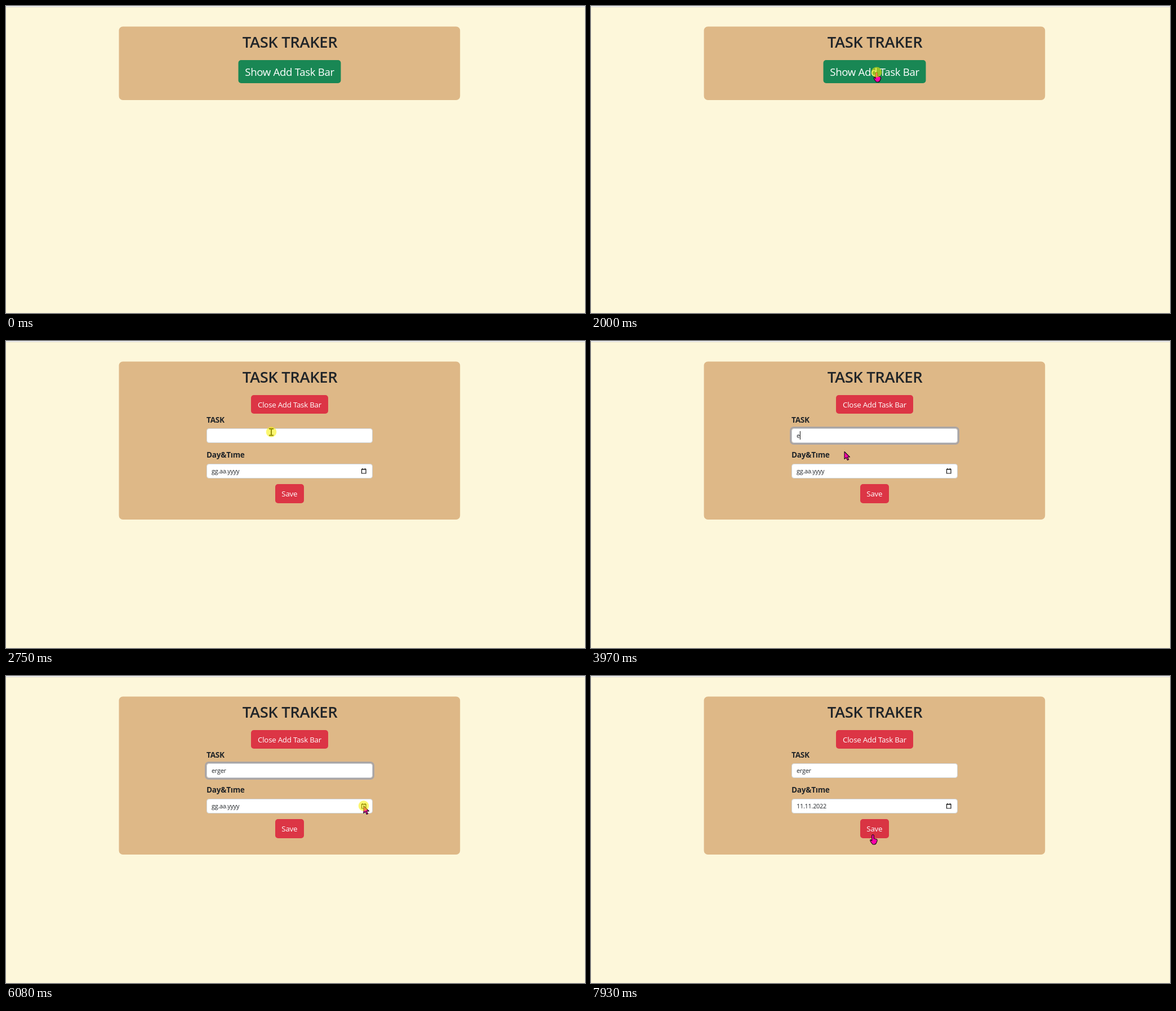
An HTML page for the animation above (8 s loop, 1028 by 545 pixels).

```html
<!DOCTYPE html>
<html lang="en">
<head>
<meta charset="utf-8">
<title>Task tracker</title>
<style>
  html, body { margin: 0; width: 100%; height: 100%; overflow: hidden; background: #fdf7da; }
  svg { display: block; width: 1028px; height: 545px; }
  text { font-family: "Open Sans", "Noto Sans", sans-serif; letter-spacing: -.018em; fill: #212529; white-space: pre; }
  .title { font-size: 27.4px; font-weight: 600; letter-spacing: -.014em; }
  .mid { text-anchor: middle; }
  .btn { font-size: 13.3px; fill: #fff; }
  .big { font-size: 18.65px; }
  .label { font-size: 13.6px; font-weight: 700; }
  .field { font-size: 10.8px; letter-spacing: -.02em; }
  .input { fill: #fff; stroke: #ced4da; }
  .cal text { font: 8.2px "Liberation Sans", Arial, sans-serif; letter-spacing: 0; fill: #101010; }
  .cal .month { font-size: 8px; font-weight: 700; }
  .cal .link { font-size: 8px; fill: #0069c8; }
  .cal .dim { fill: #777; }
  .cal .today { fill: #fff; font-weight: 700; }
  .pop { filter: drop-shadow(0 1px 2px rgba(0, 0, 0, .35)); }
  .pink { fill: #f0a; stroke: #1a0a14; stroke-width: 1.1; stroke-linejoin: round; }
</style>
</head>
<body>
<svg viewBox="0 0 1028 545">
  <rect width="1028" height="545" fill="#fdf7da"/>
  <rect width="1028" height="1" fill="#fff"/>
  <rect y="1" width="1028" height="1" fill="#d3d3d1"/>
  <rect id="panel" x="200.5" y="36.5" width="605.7" height="130.5" rx="7" fill="#deb887"/>
  <text class="title mid" x="504" y="74.3">TASK TRAKER</text>

  <g id="closed">
    <rect x="412.5" y="96" width="182" height="41" rx="5" fill="#198754"/>
    <text class="btn big mid" x="503.5" y="124">Show Add Task Bar</text>
  </g>

  <g id="form">
    <rect x="435" y="96" width="137" height="33" rx="5" fill="#dc3545"/>
    <text class="btn mid" x="503.5" y="117.7">Close Add Task Bar</text>
    <text class="label" x="356" y="144.7">TASK</text>
    <rect id="ring" x="354.5" y="153.5" width="298" height="29" rx="5.5" fill="none" stroke="#0d6efd" stroke-opacity=".25" stroke-width="3"/>
    <rect id="task" class="input" x="356.5" y="155.5" width="294" height="25" rx="4"/>
    <text id="typed" class="field" x="365" y="172"></text>
    <rect id="caret" y="160" width="1" height="15" fill="#111"/>
    <text class="label" x="356" y="206.7">Day&amp;Tıme</text>
    <rect class="input" x="356.5" y="218.5" width="294" height="25" rx="4"/>
    <text id="date" class="field" x="365" y="235"></text>
    <path d="M631.5 227.5h7.5v7.5h-7.5zM631 228h8.5M633 226v1.5M637.5 226v1.5" fill="none" stroke="#111" stroke-width="1.2"/>
    <rect id="save" x="478" y="254" width="51" height="34" rx="5"/>
    <text class="btn mid" x="503.3" y="276">Save</text>
  </g>

  <g id="hints">
    <rect id="hintBox" y="129.5" height="30" fill="#f2f2f2" stroke="#cbcbcb"/>
    <text class="field" y="149"></text>
    <text class="field" y="149"></text>
    <text class="field" y="149"></text>
  </g>

  <g id="cal" class="cal">
    <rect class="pop" x="356.5" y="244.5" width="148" height="190" fill="#fff" stroke="#bdbdbd"/>
    <text class="month" x="363.7" y="262.7">Kasım 2022</text>
    <path d="M411 259h4.6l-2.3 2.6z" fill="#111"/>
    <path d="M465.5 265.5v-10m-4.5 4.5l4.5-4.5l4.5 4.5M487.5 255v10m-4.5-4.5l4.5 4.5l4.5-4.5" fill="none" stroke="#222"/>
    <rect x="478" y="294.8" width="18" height="18" fill="#0075ff" stroke="#101010"/>
    <rect id="hover" x="440.5" y="314.2" width="18" height="18" fill="#dfe9f5" stroke="#22304a"/>
    <g id="days"></g>
    <text class="link" x="371" y="424">Temizle</text>
    <text class="link" x="465.7" y="424">Bugün</text>
  </g>

  <g id="pointer">
    <path id="arrow" class="pink" d="M0 0V13L3 10.3L5.3 15L7.6 14L5.3 9.5H9.5Z"/>
    <path id="hand" class="pink" d="M-1.8 1.5Q0-1 1.8 1.5V7L6.5 8.3Q8 8.8 7.5 11.5L6 15Q5 17.5 2 17.5H0Q-2 16-4 12.5Q-5.5 9.5-4 9L-1.8 11Z"/>
    <path id="beam" d="M-4-5.5H4M0-5.5V6M-4 6H4" fill="none" stroke="#111" stroke-width="2"/>
    <circle id="halo" r="9.3" fill="#faf000" fill-opacity=".56"/>
  </g>
</svg>

<script>
const LOOP = 8000, STEP = 70;
const OPEN = 2140, FOCUS = 2800, BLUR = 6080, CAL_OPEN = 6270, CAL_CLOSE = 7300;
const WORD = 'erger', FIRST_KEY = 3970, KEY_GAP = 182, BLINK = 500;
const CLICKS = [1870, 2750, BLUR, 7100], CLICK_TIME = 200;

const hints = { er: ['er', 'ere', 'erk'], erger: ['eğer', 'erer', 'erge'] };

// each move bows sideways by a share of its length
const home = { x: 988, y: 531 };
const moves = [
  { from: 130, to: 900, x: 559, y: 187, bow: -.07 },
  { from: 970, to: 1600, x: 507, y: 117.5, bow: -.8 },
  { from: 2200, to: 2550, x: 471, y: 161.5, bow: 0 },
  { from: 2890, to: 3170, x: 450, y: 196.5, bow: 0 },
  { from: 5100, to: 5870, x: 635, y: 230.5, bow: .15 },
  { from: CAL_OPEN, to: 6900, x: 450, y: 323.5, bow: -.15 },
  { from: CAL_CLOSE, to: 7930, x: 500.5, y: 281.5, bow: 0 }
];

const $ = id => document.getElementById(id);
const show = (id, on) => $(id).setAttribute('display', on ? 'inline' : 'none');
const set = (id, attrs) => { for (const k in attrs) $(id).setAttribute(k, attrs[k]); };
const clamp = v => Math.min(1, Math.max(0, v));
const easeOut = u => 1 - (1 - u) ** 2;

function buildDays() {
  const cell = (col, row, label, cls = '') =>
    `<text class="mid ${cls}" x="${373 + col * 19}" y="${287 + row * 19.2 + (row ? .7 : 0)}">${label}</text>`;
  let out = 'Pt Sa Ça Pe Cu Ct Pa'.split(' ').map((d, i) => cell(i, 0, d)).join('');
  for (let i = 0; i < 42; i++) {
    const day = i ? (i - 1) % 30 + 1 : 31;
    const cls = i === 6 ? 'today' : i === 0 || i > 30 ? 'dim' : '';
    out += cell(i % 7, 1 + Math.floor(i / 7), day, cls);
  }
  $('days').innerHTML = out;
}

function pointerAt(t) {
  const i = Math.max(0, moves.findLastIndex(m => t >= m.from));
  const a = moves[i - 1] || home, b = moves[i];
  const u = easeOut(clamp(Math.floor((t - b.from) / STEP) * STEP / (b.to - b.from)));
  const dx = b.x - a.x, dy = b.y - a.y, side = 2 * u * (1 - u) * b.bow;
  return [a.x + dx * u - dy * side, a.y + dy * u + dx * side];
}

function drawPointer(t, open, calendar) {
  const [x, y] = pointerAt(t);
  const over = (left, top, right, bottom) => x >= left && x < right && y >= top && y < bottom;
  const onSave = open && !calendar && over(478, 254, 529, 288);
  const hand = onSave || (open ? over(435, 96, 572, 129) : over(413, 96, 594, 137));
  const beam = open && over(356, 155, 651, 181);
  show('pointer', t >= moves[0].from);
  show('hand', hand);
  show('beam', beam);
  show('arrow', !hand && !beam);
  show('halo', CLICKS.some(c => t >= c && t < c + CLICK_TIME));
  show('hover', over(440, 314, 459, 333));
  set('pointer', { transform: `translate(${x} ${y})` });
  set('save', { fill: onSave ? '#d93443' : '#dc3545' });
}

function drawTyping(t) {
  const count = Math.min(WORD.length, Math.max(0, Math.floor((t - FIRST_KEY) / KEY_GAP) + 1));
  const text = WORD.slice(0, count);
  const since = count ? FIRST_KEY + (count - 1) * KEY_GAP : FOCUS;
  const active = t >= FOCUS && t < BLUR;
  $('typed').textContent = text;
  const end = 365 + (count && $('typed').getComputedTextLength());
  set('caret', { x: end });
  show('caret', active && Math.floor((t - since) / BLINK) % 2 === 0);
  drawHints(active && hints[text], Math.round(end) - .5);
}

function drawHints(words, left) {
  show('hints', words);
  if (!words) return;
  let x = left + 6;
  document.querySelectorAll('#hints text').forEach((el, i) => {
    el.textContent = words[i];
    el.setAttribute('x', x);
    x += el.getComputedTextLength() + 14.5;
  });
  set('hintBox', { x: left, width: x - left - 5 });
}

function draw(t) {
  const open = t >= OPEN;
  const calendar = t >= CAL_OPEN && t < CAL_CLOSE;
  const focus = t <= BLUR + STEP ? clamp((t - FOCUS) / 150) : 0;

  set('panel', { height: open ? 280.5 : 130.5 });
  show('closed', !open);
  show('form', open);
  show('cal', calendar);
  set('ring', { opacity: focus });
  set('task', { stroke: focus > .5 ? '#86b7fe' : '#ced4da' });
  $('date').textContent = t < CAL_CLOSE ? 'gg.aa.yyyy' : '11.11.2022';
  drawTyping(t);
  drawPointer(t, open, calendar);
}

buildDays();
const start = performance.now();
(function tick() {
  draw((performance.now() - start) % LOOP);
  requestAnimationFrame(tick);
})();
</script>
</body>
</html>
```
